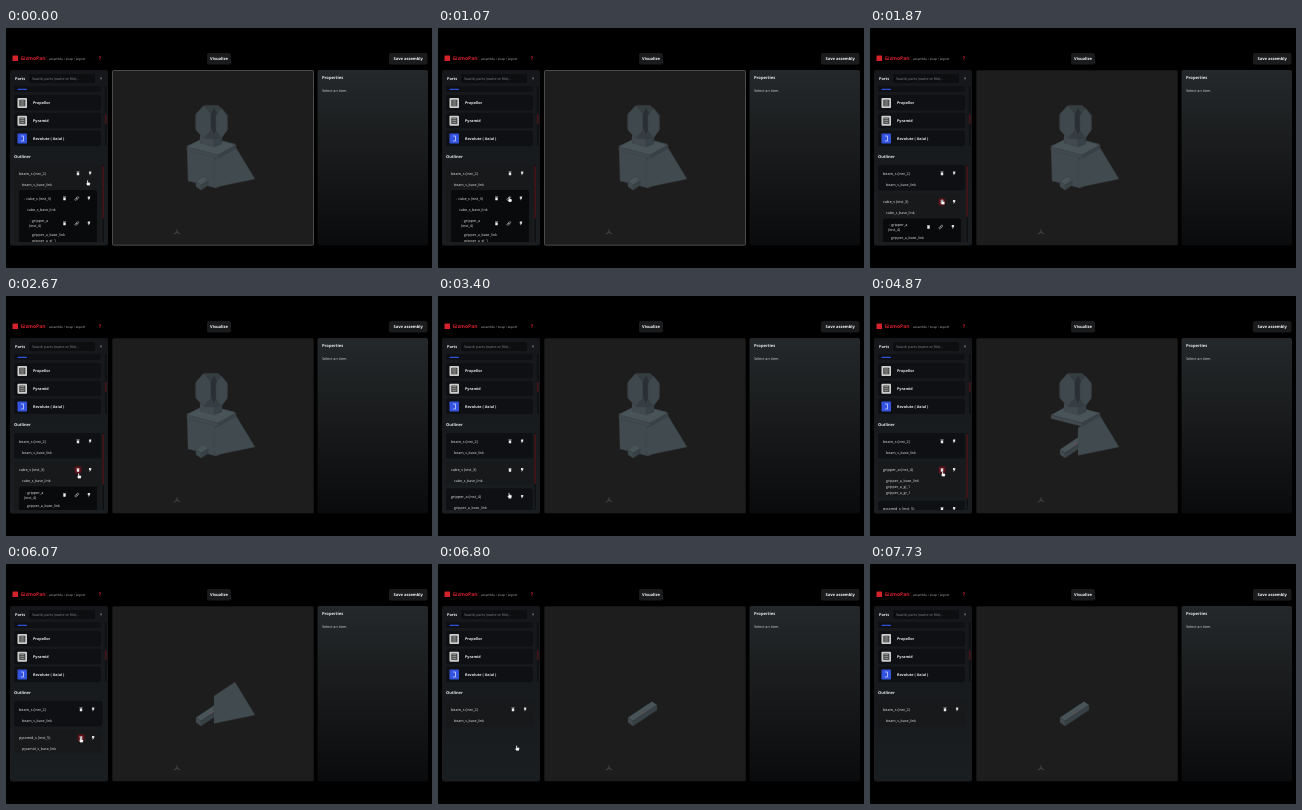
These frames come from a looping animation (426x240 px, 7.79 s). An HTML page:

```html
<!DOCTYPE html>
<html lang="en">
<head>
<meta charset="utf-8">
<title>Robot assembly editor</title>
<style>
html, body { margin: 0; width: 100%; height: 100%; overflow: hidden; background: #000; }
svg { display: block; width: 100vw; height: 100vh; }
text { font-family: "Open Sans", "Noto Sans", sans-serif; white-space: pre; text-rendering: geometricPrecision; }
</style>
</head>
<body>
<svg id="stage" viewBox="0 0 426 240"></svg>
<script>
const LOOP = 7790, TICK = 66.7;
const RED = '#d5222b', DIM_RED = '#58151b', CARD = '#0e1013', HOT_CARD = '#17191b';

const box = (x, y, w, h, fill, r = 0, extra = '') =>
  `<rect x="${x}" y="${y}" width="${w}" height="${h}" rx="${r}" fill="${fill}" ${extra}/>`;
const label = (x, mid, str, size = 3.7, weight = 400, fill = '#e8e8e8', anchor = 'start') =>
  `<text x="${x}" y="${mid + size * 0.36}" font-size="${size}" font-weight="${weight}" text-anchor="${anchor}" fill="${fill}">${str}</text>`;
const line = (d, color, w = 0.6) =>
  `<path d="${d}" fill="none" stroke="${color}" stroke-width="${w}"/>`;
const group = (id, body) => `<g id="${id}">${body}</g>`;
const scrollbar = (x, y, len, thumbY, thumb) =>
  box(x, y, 1.2, len, '#0c0d0f', 0.6) + box(x, thumbY, 1.2, thumb, DIM_RED, 0.6);

// Icons are centred on x, y
const trash = (x, y) =>
  box(x - 1.2, y - 1.1, 2.4, 2.9, '#eee', 0.4) + box(x - 1.5, y - 1.9, 3, 0.6, '#eee');
const flag = (x, y) =>
  `<path d="M${x - 1} ${y - 1.9}h2.5l-.5 1.3h.5l-2 2.6.2-2h-.8z" fill="#ddd"/>`;
const chain = (x, y) => `<g transform="translate(${x} ${y}) rotate(-45)" fill="none" stroke="#ccc" stroke-width=".55">
  <rect x="-2.3" y="-.8" width="2.5" height="1.6" rx=".8"/><rect x="-.2" y="-.8" width="2.5" height="1.6" rx=".8"/></g>`;

function header() {
  const button = (x, w, str) => box(x, 25, w, 11.5, '#1a1b1c', 2)
    + label(x + w / 2, 30.8, str, 4.05, 700, '#f4f4f4', 'middle');
  return box(6.5, 27.5, 5.5, 5.5, RED, 0.5)
    + label(14.5, 30.5, 'GizmoPan', 5, 700, RED)
    + label(43, 30.5, 'assemble • snap • export', 3.15, 400, '#b5b5b5')
    + label(94, 30, '?', 5, 700, RED, 'middle')
    + button(201, 24, 'Visualize') + button(383, 38.5, 'Save assembly');
}

function partCard(name, i) {
  const mid = 75 + i * 17.75, blue = i === 2;
  const bars = [-2, 0, 2].map(d => `M14.2 ${mid + d}h4.2`).join('');
  return box(8, mid - 8, 87, 15.5, CARD, 2)
    + box(11.5, mid - 5, 9.5, 10, blue ? '#3454e0' : '#cfcfcf', 0.8)
    + (blue ? line(`M15 ${mid - 2.5}h2.5v5h-2.5`, '#c5cffa', 0.8)
      : box(13.3, mid - 3.3, 6, 6.6, '#3a3a3a', 0.5) + line(bars, '#cfcfcf', 0.7))
    + label(27, mid, name, 3.75, 700);
}

function partsPanel() {
  return box(4, 42, 98, 175.5, 'url(#left)', 2)
    + label(9, 50.5, 'Parts', 3.9, 700)
    + box(23, 46, 66, 9, '#0c0e10', 1.5) + label(26, 50.4, 'Search parts (name or file)...', 3.6, 400, '#8a8c8f')
    + label(95, 50.3, '×', 4.5, 400, '#bbb', 'middle')
    + box(8, 58, 87, 6, CARD, 2) + box(11.5, 60.7, 9.5, 1.2, '#3150d8', 0.5)
    + ['Propellor', 'Pyramid', 'Revolute ( Axial )'].map(partCard).join('')
    + scrollbar(99.2, 58, 60, 86, 10)
    + label(8, 128.3, 'Outliner', 4, 700);
}

// Parts and their links
const parts = {
  beam_s: [2, ['base_link']],
  cube_s: [3, ['base_link']],
  gripper_a: [4, ['base_link', 'gl_1', 'gr_1']],
  pyramid_s: [5, ['base_link']]
};

// When the tree changes; each > is one level of nesting
const steps = [
  [0, 'beam_s >cube_s >>gripper_a >>pyramid_s'],
  [1670, 'beam_s cube_s >gripper_a >pyramid_s'],
  [3270, 'beam_s cube_s gripper_a pyramid_s'],
  [4400, 'beam_s gripper_a pyramid_s'],
  [5130, 'beam_s pyramid_s'],
  [6670, 'beam_s']
];

function outliner(tree) {
  let y = 145.5;
  const rows = tree.split(' ').map((item, i, all) => {
    const name = item.replace(/>/g, ''), depth = item.length - name.length;
    const row = { name, depth, y };
    const nests = (all[i + 1] || '').startsWith('>'.repeat(depth + 1));
    y += (nests ? 18.9 : 20.7) + 6.1 * parts[name][1].length + (i || nests ? 0 : 1.7);
    return row;
  });
  const overflow = y - 11.5 > 214, shift = overflow ? 0 : 3;
  const hot = rows.length > 1 && !rows[1].depth ? 1 : 0;

  const body = rows.map((row, i) => {
    const { name, depth, y: top } = row, [id, links] = parts[name];
    const next = rows.slice(i + 1).find(r => r.depth <= depth);
    const x = 13 + 5 * depth, size = 3.75 - 0.07 * depth;
    const fill = i === hot ? HOT_CARD : depth ? '#090a0c' : CARD;
    const wraps = depth && name.length > 7;
    const title = wraps
      ? label(x + 1, top - 2.3, `- ${name}`, size) + label(x, top + 2.7, `(inst_${id})`, size)
      : label(x, top, `${depth ? '- ' : ''}${name} (inst_${id})`, size);
    return box(x - 5, top - 8.5, 87 + shift / 2 - 9 * depth, (next ? next.y : y) - top - 3, fill, 2)
      + title
      + (depth ? trash(58.5, top) + chain(70.8, top) + flag(82.8, top) : trash(72 + shift, top) + flag(84 + shift, top))
      + links.map((l, n) => label(x + 3, top + 10.8 + n * 6, `${name}_${l}`, 3.6)).join('');
  }).join('');
  return body + (overflow ? scrollbar(96.6, 137, 77, 138, 77 * 77 / (y - 148)) : '');
}

// Projected solids
const add = (...vs) => vs.reduce(([a, b], [c, d]) => [a + c, b + d]);
const poly = (pts, fill) =>
  `<polygon points="${pts.join(' ')}" fill="${fill}" stroke="#363f43" stroke-width=".3" stroke-linejoin="round"/>`;
const shade = k => `rgb(${[66, 76, 81].map(c => Math.round(c * k))})`;
const face = (o, a, b, k) => poly([o, add(o, a), add(o, a, b), add(o, b)], shade(k));
const prism = (o, u, v, w) =>
  face(o, u, v, 1.1) + face(o, u, w, 0.98) + face(add(o, u), v, w, 0.85);
const gem = (x, y, rx, ry, n, k) => poly(Array.from({ length: n }, (_, i) => {
  const a = (i + 0.5) * 2 * Math.PI / n;
  return [x + rx * Math.cos(a), y + ry * Math.sin(a)].map(c => +c.toFixed(2));
}), shade(k));

function model() {
  const stub = depth => prism([190, 153.5], [5, 3.6], [24 * depth, -16 * depth], [0, 5]);
  const apex = [229, 118], heel = [208, 132];
  return group('beam_s', stub(1) + line('M204 149l2-1.4', '#8a4348', 1))
    + group('cube_s', prism([181, 118], [28, 7], [20, -9], [1, 35]) + stub(0.3))
    + group('pyramid_s', poly([apex, [249, 151], [208, 159.5], heel], shade(0.98)))
    + group('gripper_a',
      prism([181, 119], [31, 8], [18, -10], [0, 3.5])
      + prism([194, 107], [14, 4], [8, -3], [0, 8])
      + gem(205.5, 94, 17.5, 18, 8, 0.8)
      + gem(197.5, 94, 8.5, 16.5, 6, 0.95)
      + gem(208, 93, 3.5, 14, 6, 0.62)
      + gem(215.5, 95, 6.5, 15, 6, 0.95));
}

const transforms = {
  'World Position': { X: '3.846', Y: '6.291', Z: '10.15' },
  'World Rotation (deg)': { Rx: '-180', Ry: '0', Rz: '-180' },
  'Local Scale': { Sx: '1', Sy: '1' }
};

function properties() {
  const field = (y, name, value) => label(316, y, name, 3.6, 400, '#85878a')
    + box(353, y - 5, 61, 10, '#08090b', 1.5) + label(356, y, value);
  let y = 80.3;
  const fields = Object.entries(transforms).map(([title, values]) => {
    const head = label(316, y += 13.8, title, 3.7, 400, '#c4c6c8');
    y -= 2.6;
    return head + Object.entries(values).map(([k, v]) => field(y += 13, k, v)).join('');
  }).join('');
  return label(316, 64.5, 'cube_s (inst_3)', 5.1, 700)
    + `<circle cx="410" cy="65.3" r="2.3" fill="none" stroke="${RED}" stroke-width=".6"/>` + line('M410 64v2.6', RED)
    + field(82.5, 'Global Scale', '1') + fields
    + scrollbar(419.8, 57, 159, 58, 122);
}

const gradient = (id, from, to) =>
  `<linearGradient id="${id}" x1="0" y1="0" x2="0" y2="1"><stop stop-color="${from}"/><stop offset="1" stop-color="${to}"/></linearGradient>`;
const clip = (id, ...rect) => `<clipPath id="${id}">${box(...rect, '#fff')}</clipPath>`;

const stage = document.getElementById('stage');
stage.innerHTML = '<defs>' + gradient('left', '#15171a', '#1b1e21') + gradient('right', '#25282a', '#0a0b0c')
  + clip('list', 4, 136, 98, 78) + clip('side', 311, 42, 111, 175.5) + '</defs>'
  + header() + partsPanel()
  + `<g clip-path="url(#list)">${steps.map(([, tree], i) => group('list' + i, outliner(tree))).join('')}</g>`
  + box(106.3, 42.3, 201.4, 175, '#1d1d1d', 1.5)
  + group('focus', box(106.5, 42.5, 201, 174.7, 'none', 1, 'stroke="#707070" stroke-width=".6"'))
  + model()
  + line('M171 204v-2.5M171 204l-3.2 2M171 204l3 2', '#77786a', 0.5)
  + box(311.5, 42, 110.5, 175.5, 'url(#right)', 2)
  + label(316, 49.3, 'Properties', 4.1, 700)
  + group('empty', label(316, 63, 'Select an item', 3.75, 400, '#d0d0d0'))
  + `<g clip-path="url(#side)">${group('props', properties())}</g>`
  + group('hover', box(-3.4, -3.8, 6.8, 7.6, '#5c121a', 2) + trash(0, 0))
  + group('hand', '<path d="M-1-2.4q.6-.6 1.1 0v1.7l1.7.4q.6.2.5.9L1.8 2.6H-.7L-2.1.6q.3-.7 1.1 0z" fill="#fff" stroke="#222" stroke-width=".3"/>');

const el = id => document.getElementById(id);
const show = (id, on) => { el(id).style.display = on ? '' : 'none'; };
const move = (id, x, y) => el(id).setAttribute('transform', `translate(${x} ${y})`);

// Pointer stops: time, x, y
const stops = [
  [0, 82, 155], [800, 71.5, 171], [1870, 72.5, 174], [2670, 73, 180], [3270, 71.5, 200],
  [4000, 71, 181], [4870, 73, 178], [6070, 75, 176], [7270, 82, 190]
];
const ease = u => u * u * (3 - 2 * u);

function pointer(t) {
  const i = stops.findIndex(s => s[0] > t);
  if (i < 0) return null;
  const [t0, x0, y0] = stops[i - 1], [t1, x1, y1] = stops[i];
  const k = ease((t - t0) / (t1 - t0));
  return [x0 + (x1 - x0) * k, y0 + (y1 - y0) * k];
}

function draw(now) {
  const t = Math.floor((now % LOOP) / TICK + 0.01) * TICK;
  const current = steps.filter(s => s[0] <= t + 1).length - 1;
  const tree = steps[current][1];
  steps.forEach((_, i) => show('list' + i, i === current));
  Object.keys(parts).forEach(name => show(name, tree.includes(name)));
  show('focus', current === 0);

  const selected = t >= 3860 && t < 4400;
  show('props', selected);
  show('empty', !selected);

  const pos = pointer(t);
  show('hand', pos);
  if (pos) move('hand', ...pos);

  // The second row's trash button lights up under the pointer
  const over = pos && current > 0 && current < 5 && Math.abs(pos[1] - 176) < 4.6;
  show('hover', over);
  if (over) move('hover', current === 4 ? 75 : 72, 174);
}

const start = performance.now();
function frame() {
  draw(performance.now() - start);
  requestAnimationFrame(frame);
}
frame();
</script>
</body>
</html>
```
